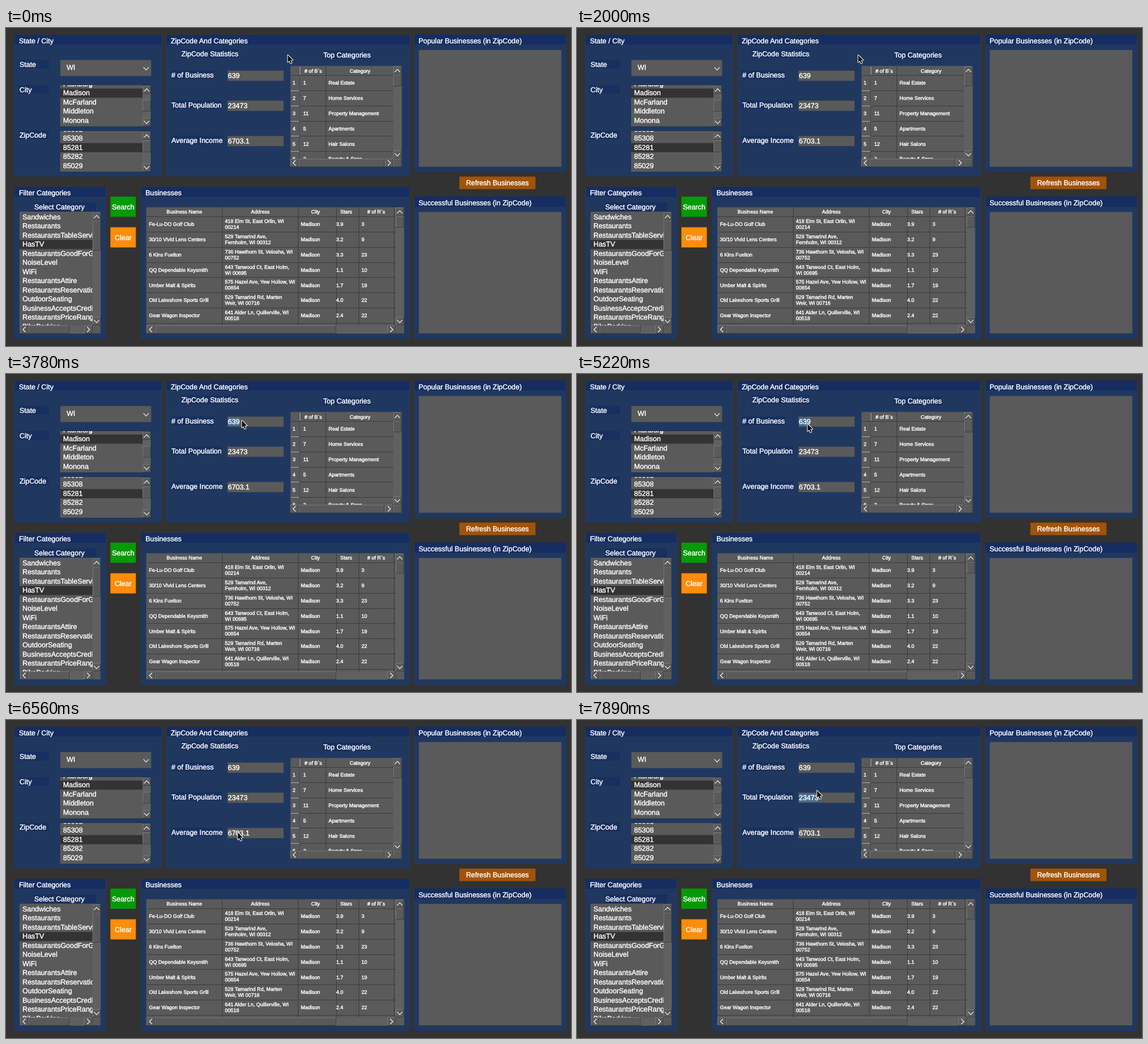
Recreate the animation shown at these times as an HTML page with a canvas. Size 960 by 540 pixels, loop 8000 ms.

```html
<!DOCTYPE html>
<html lang="en">
<head>
<meta charset="utf-8">
<title>Business finder</title>
<style>
html, body { margin: 0; width: 100%; height: 100%; overflow: hidden; background: #323232; }
canvas { display: block; }
</style>
</head>
<body>
<canvas id="stage" width="960" height="540"></canvas>
<script>
const ctx = document.getElementById('stage').getContext('2d');
const GRAY = '#5a5a5a', DARK = '#333', GRID = '#3c3c3c';
const PANEL = '#20385f', BAND = '#152d61', LOOP = 8000, FPS = 9;
const FONT = '"Liberation Sans", Arial, sans-serif';

function box(x, y, x2, y2, color) {
  ctx.fillStyle = color;
  ctx.fillRect(x, y, x2 - x, y2 - y);
}

// A box with slightly soft edges
function softBox(x, y, x2, y2, color) {
  box(x + .4, y + .4, x2 - .4, y2 - .4, color);
}

function text(str, x, y, size = 12, align = 'left') {
  ctx.font = `${size}px ${FONT}`;
  ctx.textAlign = align;
  ctx.fillStyle = ctx.strokeStyle = '#fff';
  ctx.lineWidth = 0.4;
  ctx.fillText(str, x, y);
  ctx.strokeText(str, x, y);
}

function small(str, x, y, align) { text(str, x, y, 8.65, align); }

function clipped(x, y, x2, y2, draw) {
  ctx.save();
  ctx.beginPath();
  ctx.rect(x, y, x2 - x, y2 - y);
  ctx.clip();
  draw();
  ctx.restore();
}

function bevel(x, y, x2, y2) {
  box(x, y, x2, y2, '#424242');
  box(x, y, x2 - 1, y2 - 1, '#777');
  box(x + 1, y + 1, x2 - 1, y2 - 1, GRAY);
}

function chevron(x, y, turns) {
  ctx.save();
  ctx.translate(x, y);
  ctx.rotate(turns * Math.PI / 2);
  ctx.beginPath();
  ctx.moveTo(-4.5, 2.3);
  ctx.lineTo(0, -2.3);
  ctx.lineTo(4.5, 2.3);
  ctx.strokeStyle = '#eee';
  ctx.lineWidth = 1.2;
  ctx.stroke();
  ctx.restore();
}

function vScroll(x, y, y2, thumb, thumbEnd) {
  box(x, y, x + 14, y2, '#606060');
  bevel(x, y, x + 14, y + 14);
  bevel(x, y2 - 14, x + 14, y2);
  bevel(x, thumb, x + 14, thumbEnd);
  chevron(x + 7, y + 7.5, 0);
  chevron(x + 7, y2 - 7, 2);
}

function hScroll(x, x2, y, thumb, thumbEnd) {
  box(x, y, x2, y + 14, '#606060');
  bevel(x, y, x + 14, y + 14);
  bevel(x2 - 14, y, x2, y + 14);
  bevel(thumb, y, thumbEnd, y + 14);
  chevron(x + 7, y + 7, 3);
  chevron(x2 - 7, y + 7, 1);
}

function panel(title, x, y, x2, y2, bandEnd) {
  ctx.beginPath();
  ctx.roundRect(x + .5, y + .5, x2 - x - 1, y2 - y - 1, 3);
  ctx.fillStyle = PANEL;
  ctx.fill();
  ctx.strokeStyle = '#1c3a70';
  ctx.lineWidth = 1;
  ctx.stroke();
  box(x + 1, y, x2 - 1, bandEnd, BAND);
  text(title, x + 8, bandEnd - 2.5);
}

function label(str, x, y, width) {
  box(x, y - 12, x + width, y + 3, '#18305f');
  text(str, x + 1, y);
}

function list(items, x, y, x2, y2, baseline, selected) {
  const step = 15.46;
  box(x, y, x2, y2, GRAY);
  clipped(x, y, x2, y2, () => items.forEach((item, i) => {
    const base = baseline + i * step;
    if (i === selected) box(x, base - 11.5, x2, base + 4, DARK);
    text(item, x + 5, base);
  }));
}

function button(str, x, y, x2, y2, color) {
  softBox(x, y, x2, y2, color);
  text(str, (x + x2) / 2, (y + y2) / 2 + 4.3, 12, 'center');
}

function stateCity() {
  panel('State / City', 14, 12, 265, 252, 28);
  label('State', 22, 66, 51);
  label('City', 22, 109, 51);
  label('ZipCode', 22, 186, 51);
  softBox(92, 54, 247, 82, GRAY);
  text('WI', 103, 71);
  chevron(238, 69, 2);
  list(['Fitchburg', 'Madison', 'McFarland', 'Middleton', 'Monona'], 92, 97, 232, 167, 98.8, 1);
  vScroll(232, 98, 167, 122, 142);
  list(['85302', '85308', '85281', '85282', '85029'], 92, 175, 232, 244, 176, 2);
  vScroll(232, 176, 244, 191, 211);
}

function statistics() {
  panel('ZipCode And Categories', 272, 12, 686, 252, 28);
  label('ZipCode Statistics', 297, 48, 98);
  label('Top Categories', 538, 50, 82);
  label('# of Business', 280, 84, 74);
  label('Total Population', 280, 134.5, 87);
  label('Average Income', 280, 194.5, 88);
}

function topCategories() {
  const rows = [[1, 'Real Estate'], [7, 'Home Services'], [11, 'Property Management'],
    [5, 'Apartments'], [12, 'Hair Salons'], [2, 'Beauty & Spas']];
  softBox(483, 64, 673, 236, GRAY);
  box(499, 66, 500, 79, '#aaa');
  box(484, 80, 658, 81, GRID);
  box(543, 65, 544, 222, GRID);
  small('# of B`s', 522, 75.5, 'center');
  small('Category', 601.5, 75.5, 'center');
  clipped(484, 65, 658, 222, () => rows.forEach(([count, name], i) => {
    const y = 96.3 + i * 25.8, line = Math.round(106 + i * 25.8);
    small(i + 1, 487, y);
    small(count, 505, y);
    small(name, 548, y);
    box(499, line, 658, line + 1, GRID);
    box(484, line, 498, line + 1, '#aaa');
    box(498, line - 25, 499, line, '#484848');
  }));
  vScroll(658, 65, 222, 79, 99);
  hScroll(483, 658, 222, 497, 643);
  bevel(658, 222, 672, 236);
}

function filters() {
  panel('Filter Categories', 14, 270, 170, 528, 286.5);
  label('Select Category', 47, 308, 106);
  softBox(23, 312, 161, 519, GRAY);
  list(['Sandwiches', 'Restaurants', 'RestaurantsTableService', 'HasTV',
    'RestaurantsGoodForGroups', 'NoiseLevel', 'WiFi', 'RestaurantsAttire',
    'RestaurantsReservations', 'OutdoorSeating', 'BusinessAcceptsCreditCards',
    'RestaurantsPriceRange', 'BikeParking'], 23, 312, 147, 505, 325, 3);
  vScroll(147, 313, 505, 327, 378);
  hScroll(24, 147, 505, 38, 108);
  button('Search', 177, 286, 221, 321, '#079a07');
  button('Clear', 177, 338, 221, 373, '#ff8d0b');
}

function businesses() {
  const rows = [
    ['Fe-Lu-DO Golf Club', '418 Elm St, East Orlin, WI', '00214', '3.9', 3],
    ['30/10 Vivid Lens Centers', '529 Tamarind Ave,', 'Fernholm, WI 00312', '3.2', 9],
    ['6 Kins Fuelton', '736 Hawthorn St, Velosha, WI', '00752', '3.3', 23],
    ['QQ Dependable Keysmith', '643 Tanwood Ct, East Holm,', 'WI 00695', '1.1', 10],
    ['Umber Malt & Spirits', '575 Hazel Ave, Yew Hollow, WI', '00854', '1.7', 19],
    ['Old Lakeshore Sports Grill', '529 Tamarind Rd, Marten', 'Weir, WI 00716', '4.0', 22],
    ['Gear Wagon Inspector', '641 Alder Ln, Quillerville, WI', '00518', '2.4', 22]];
  panel('Businesses', 229, 270, 686, 528, 286.5);
  softBox(238, 304, 677, 519, GRAY);
  [['Business Name', 303], ['Address', 432], ['City', 526], ['Stars', 578], ['# of R`s', 629]]
    .forEach(([name, x]) => small(name, x, 315.3, 'center'));
  [367, 496, 561, 599, 659].forEach(x => box(x, 305, x + 1, 505, GRID));
  box(239, 320, 662, 321, GRID);
  rows.forEach(([name, street, town, stars, reviews], i) => {
    const y = 336.3 + i * 25.8, line = Math.round(346 + i * 25.8);
    small(name, 243, y);
    small(street, 372, y - 5.2);
    small(town, 372, y + 4.8);
    small('Madison', 501, y);
    small(stars, 561, y);
    small(reviews, 604, y);
    box(239, line, 662, line + 1, GRID);
  });
  vScroll(662, 305, 505, 319, 339);
  hScroll(239, 662, 505, 253, 561);
}

function results() {
  panel('Popular Businesses (in ZipCode)', 693, 11, 952, 244, 28);
  softBox(701, 37, 944, 236, GRAY);
  button('Refresh Businesses', 770, 252, 900, 274, '#a25307');
  panel('Successful Businesses (in ZipCode)', 693, 286, 952, 528, 303.5);
  softBox(701, 312, 944, 519, GRAY);
}

const stats = [ // value, top of field, spans of time when selected
  ['639', 72, [[3770, 5500]]],
  ['23473', 123, [[5600, 6400], [7500, LOOP]]],
  ['6703.1', 183, [[6660, 7400]]]
];

const path = [ // time, x, y of the pointer tip
  [0, 478, 45], [780, 477, 45], [2780, 477, 45], [2890, 476, 45], [3560, 400, 78],
  [3780, 400, 78], [4330, 392, 83], [5110, 392, 83], [5220, 391, 84], [5670, 396, 126],
  [6220, 396, 126], [6560, 393, 190], [7110, 394, 190], [7560, 388, 125],
  [7670, 388, 125], [7890, 407, 119], [LOOP, 407, 119]
];

function drawStats(t) {
  for (const [value, y, spans] of stats) {
    softBox(376, y, 472, y + 18, GRAY);
    if (spans.some(([from, to]) => t >= from && t < to)) {
      ctx.font = `12px ${FONT}`;
      box(377, y + 2, 377 + ctx.measureText(value).width, y + 16, '#476f93');
    }
    text(value, 377, y + 13.3);
  }
}

function pointerAt(t) {
  const i = path.findIndex(p => p[0] > t);
  const [t0, x0, y0] = path[i - 1], [t1, x1, y1] = path[i];
  const u = (t - t0) / (t1 - t0), k = u * u * (3 - 2 * u);
  return [x0 + (x1 - x0) * k, y0 + (y1 - y0) * k];
}

function drawPointer(t) {
  ctx.save();
  ctx.translate(...pointerAt(t));
  ctx.beginPath();
  [[.8, 1], [.8, 13], [3.5, 10.5], [5.5, 15.1], [7.5, 14.2], [5.6, 9.7], [9.3, 9.5]]
    .forEach(p => ctx.lineTo(...p));
  ctx.closePath();
  ctx.lineJoin = 'round';
  ctx.lineWidth = 2;
  ctx.strokeStyle = '#eee';
  ctx.stroke();
  ctx.fillStyle = '#111';
  ctx.fill();
  ctx.restore();
}

function frame(now) {
  // The picture steps nine times a second.
  const t = Math.floor((now % LOOP + 5) * FPS / 1000) * 1000 / FPS % LOOP;
  box(0, 0, 960, 540, '#323232');
  [stateCity, statistics, topCategories, filters, businesses, results].forEach(draw => draw());
  drawStats(t);
  drawPointer(t);
  requestAnimationFrame(frame);
}
ctx.textRendering = 'geometricPrecision';
requestAnimationFrame(frame);
</script>
</body>
</html>
```
